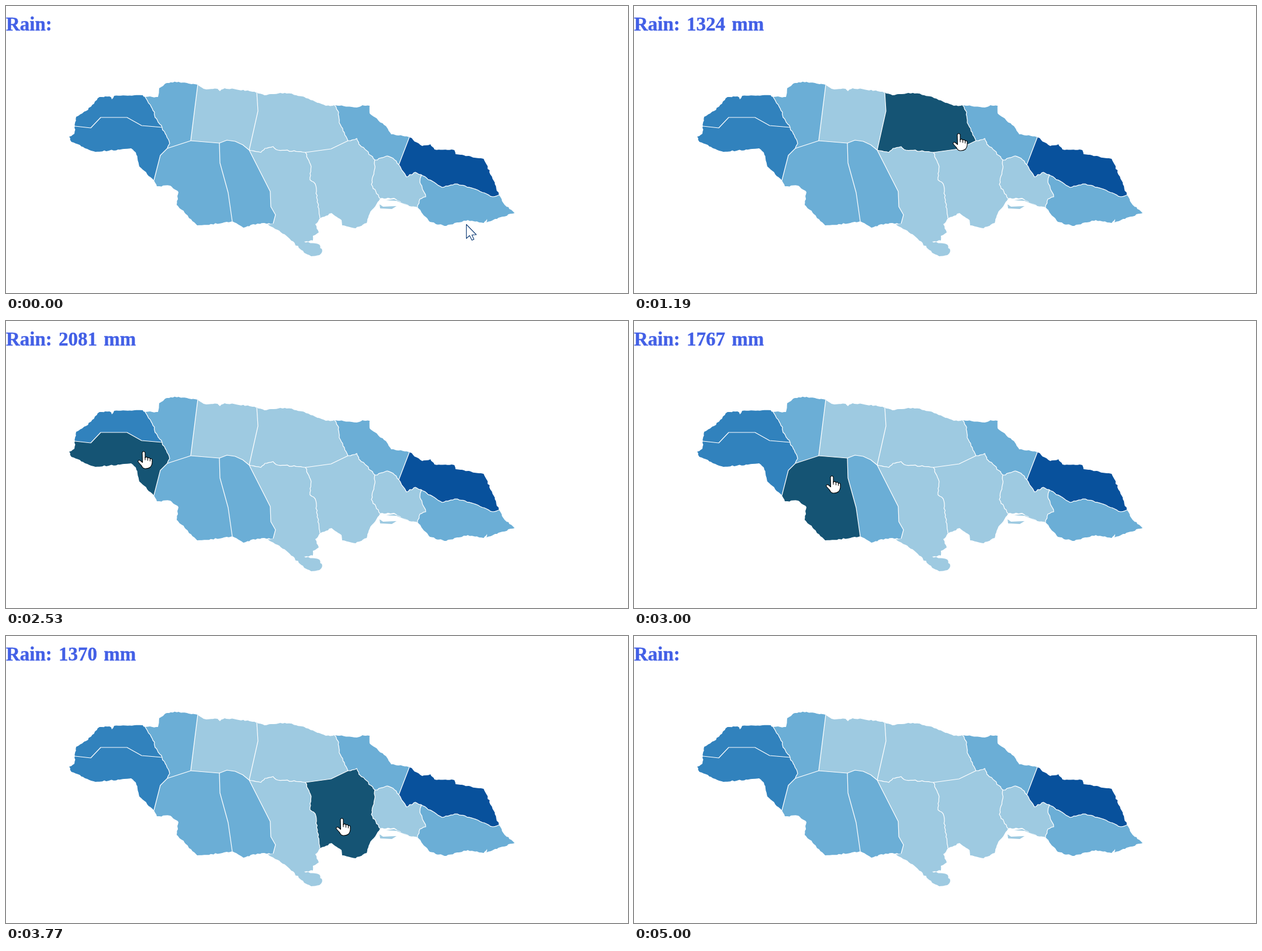
An HTML page with a canvas that plays this animation: 1064x492 px, repeating every 5.79 s.

```html
<!DOCTYPE html>
<html lang="en">
<head>
<meta charset="utf-8">
<title>Rain map</title>
<style>
  html, body { margin: 0; width: 1064px; height: 492px; overflow: hidden; background: #fff; }
  canvas { display: block; }
  #rain {
    position: absolute; left: 0; top: 13px; white-space: pre; word-spacing: 3px;
    font: bold 33px "Liberation Serif", serif; color: #4360e6; -webkit-text-stroke: 0.4px;
  }
</style>
</head>
<body>
<canvas id="map" width="1064" height="492"></canvas>
<div id="rain">Rain:</div>
<script>
const LOOP = 5790, EXIT = 5000;
const ctx = document.getElementById('map').getContext('2d');
const label = document.getElementById('rain');
const points = text => text.split(' ').map(pair => pair.split(',').map(Number));

// Junctions where borders meet each other or the coast.
const nodes = {};
points('118,206 238,156 267,208 276,244 253,299 328,135 316,231 365,235 416,247 429,148 387,369 457,373 ' +
  '512,251 537,364 562,170 585,231 631,264 672,272 690,225 710,289 843,324 704,345 640,330')
  .forEach((point, i) => nodes['ABCDEFGHIJKLMNOPQRSTUVW'[i]] = point);

// Key points between two junctions; pairs not listed are straight.
const smooth = {
  AC: '145,209 162,191 207,191 232,205', DE: '264,256', HI: '378,230 392,232 405,238',
  HK: '366,269 380,320', IJ: '431,180', IL: '452,318 453,344 461,358', MP: '556,245'
};
const rough = {
  AB: '120,190 137,180 160,156 177,155 181,160 185,154 234,153',
  AE: '117,219 108,224 112,233 153,250 214,244 222,251 228,275',
  EK: '258,309 281,308 295,319 292,341 327,376 370,372',
  KL: '406,380 430,373',
  LN: '448,374 482,396 510,423 522,429 536,427 541,420 536,409 510,404 525,402 525,394 535,388 529,374',
  NW: '557,355 574,367 575,376 598,381 617,372 622,356',
  BF: '260,156 262,141 275,132 295,130',
  FJ: '338,142 362,142 366,146 374,141 425,147',
  JO: '442,153 477,149 507,155 547,171',
  OS: '600,174 610,170 622,171 622,184 650,206 659,220',
  SU: '712,240 726,237 733,246 767,247 769,254 817,262 834,299',
  UV: '853,341 870,355 846,362 822,371 824,362 817,372 790,367 750,377 725,370',
  BC: '254,182 255,191',
  CD: '280,236',
  IM: '436,251 443,244 457,241 462,246',
  MN: '522,275 520,298 529,305',
  OP: '569,182 570,200',
  PQ: '600,227 606,239 617,248',
  QR: '652,257 662,261',
  QW: '631,278 625,306',
  RT: '685,293 700,285',
  TU: '746,311 772,305 800,313 833,327',
  TV: '708,302 718,327 708,331',
  WV: '664,329 690,343'
};

let seed = 7;
const jitter = () => (seed = seed * 16807 % 2147483647) / 2147483647 * 2 - 1;

// Adds small notches along a line.
function roughen(line) {
  return line.flatMap(([x, y], i) => {
    if (!i) return [[x, y]];
    const [px, py] = line[i - 1];
    const parts = Math.ceil(Math.hypot(x - px, y - py) / 4);
    return Array.from({ length: parts }, (_, k) => {
      const f = (k + 1) / parts, size = f < 1 ? 1 : 0;
      return [px + (x - px) * f + jitter() * size, py + (y - py) * f + jitter() * size];
    });
  });
}

const arcs = {};
for (const [key, text] of Object.entries({ ...smooth, ...rough })) {
  const line = [nodes[key[0]], ...points(text), nodes[key[1]]];
  arcs[key] = key in rough ? roughen(line) : line;
}

function arc(a, b) {
  if (arcs[a + b]) return arcs[a + b];
  return arcs[b + a] ? [...arcs[b + a]].reverse() : [nodes[a], nodes[b]];
}

function trace(line) {
  const path = new Path2D();
  line.forEach(([x, y]) => path.lineTo(x, y));
  return path;
}

const LIGHT = '#9ecae1', MID = '#6baed6', DEEP = '#3182bd', DARKEST = '#08519c', HOVER = '#155474';
const edges = new Set(), borders = [];
const regions = [
  ['ABC', DEEP, 2204], ['ACDE', DEEP, 2081], ['BFGDC', MID, 1712], ['FJIHG', LIGHT, 1275],
  ['DGHKE', MID, 1767], ['HILK', MID, 1649], ['IMNL', LIGHT, 1301], ['JOPMI', LIGHT, 1324],
  ['MPQWN', LIGHT, 1370], ['OSRQP', MID, 1733], ['QRTVW', LIGHT, 1437], ['SUTR', DARKEST, 3361],
  ['TUV', MID, 1843]
].map(([ring, color, rain]) => {
  const outline = [...ring].flatMap((a, i) => {
    const b = ring[(i + 1) % ring.length], line = arc(a, b);
    // An edge met a second time lies between two regions.
    if (edges.has(b + a) || edges.has(a + b)) borders.push(trace(line));
    edges.add(a + b);
    return line;
  });
  return { color, rain, path: trace(outline) };
});
const islets = ['639,340 645,344 668,343 660,348 640,347', '650,333 664,331 690,343 668,334']
  .map(text => trace(points(text)));

const arrow = new Path2D('M0 0V24L5.5 19 9.5 27 13 25.5 9.5 18 17 17.5Z');
const hand = new Path2D('M-2.5 2Q0-2 2.5 2V11Q5 8 7 11.5Q10 9.5 11 13Q14.5 11.5 14.5 15V20Q14 24 11.5 27' +
  'Q8 30 2 29.5Q-2 29-4 24L-9.5 18Q-10 14-6 15.5L-2 19Z');
const fingers = new Path2D('M2.5 10V15M7 11V16M11 13V17');

// Pointer stops: time, x, y.
const track = [
  [0, 787, 374], [70, 787, 374], [580, 735, 280], [1194, 556, 221], [2072, 333, 194],
  [2450, 222, 190], [2530, 236, 226], [3465, 440, 309], [4085, 715, 322], [4930, 993, 482]
];
const blocks = [70, 660, 1270, 1920, 2530, 3160, 3770, 4400, EXIT];

// The pointer moves in eight steps per block.
function sampleTime(t) {
  const i = blocks.findLastIndex(start => start <= t);
  if (i < 0) return 0;
  if (t >= EXIT) return EXIT;
  const step = (blocks[i + 1] - blocks[i]) / 8;
  return blocks[i] + step * Math.min(7, Math.floor((t + 12 - blocks[i]) / step));
}

function pointerAt(t) {
  const i = track.findIndex(stop => stop[0] > t);
  if (i < 0) return track.at(-1).slice(1);
  const [t0, x0, y0] = track[i - 1], [t1, x1, y1] = track[i];
  const f = (t - t0) / (t1 - t0);
  return [x0 + (x1 - x0) * f, y0 + (y1 - y0) * f];
}

function drawPointer(x, y, active) {
  const shape = active ? hand : arrow;
  ctx.save();
  ctx.translate(Math.round(x) + (active ? -0.5 : 0.5), Math.round(y) + (active ? -2.5 : 0.5));
  ctx.fillStyle = '#fff';
  ctx.strokeStyle = active ? '#000' : '#0b3a75';
  ctx.lineWidth = 1.1;
  ctx.fill(shape);
  ctx.stroke(shape);
  if (active) ctx.stroke(fingers);
  ctx.restore();
}

function draw(t) {
  const time = sampleTime(t), visible = time < EXIT;
  const [x, y] = pointerAt(time);
  const active = visible && regions.find(region => ctx.isPointInPath(region.path, x, y));

  ctx.clearRect(0, 0, 1064, 492);
  for (const region of regions) {
    ctx.fillStyle = region === active ? HOVER : region.color;
    ctx.fill(region.path);
  }
  ctx.fillStyle = LIGHT;
  islets.forEach(path => ctx.fill(path));
  ctx.lineJoin = 'round';
  ctx.lineWidth = 1.2;
  ctx.strokeStyle = '#fff';
  borders.forEach(path => ctx.stroke(path));
  if (visible) drawPointer(x, y, active);

  const text = active ? `Rain: ${active.rain} mm` : 'Rain:';
  if (label.textContent !== text) label.textContent = text;
}

const start = performance.now();
function frame() {
  draw((performance.now() - start) % LOOP);
  requestAnimationFrame(frame);
}
frame();
</script>
</body>
</html>
```
